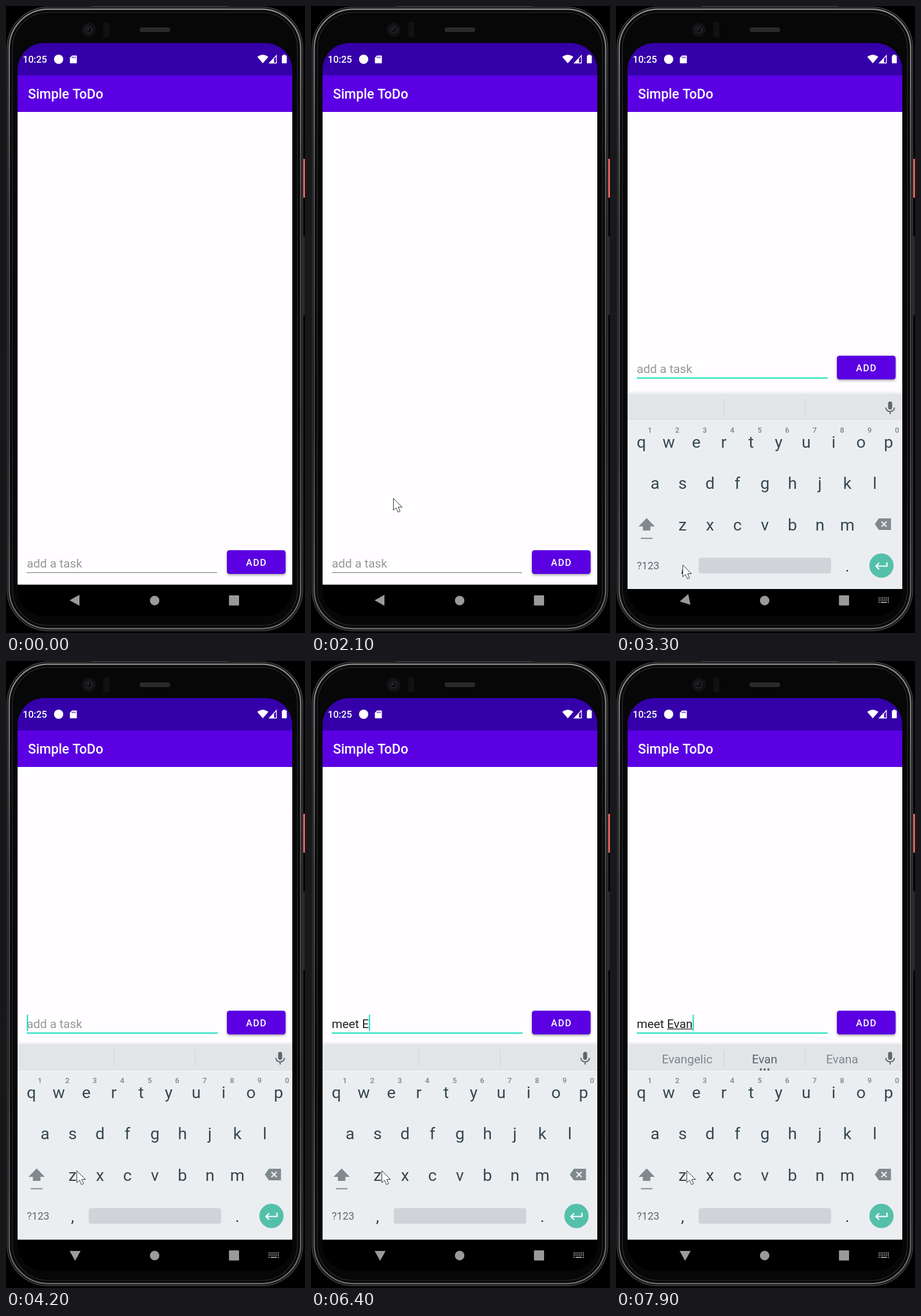
Write an HTML page with a canvas that moves like this. It is 517 px wide and 1083 px high and loops after 8 s.

```html
<!DOCTYPE html>
<html lang="en">
<head>
<meta charset="utf-8">
<title>Simple ToDo</title>
<style>
  html, body { margin: 0; width: 100%; height: 100%; overflow: hidden; background: #000; }
  canvas { display: block; }
</style>
</head>
<body>
<canvas width="517" height="1083"></canvas>
<script>
const ctx = document.querySelector('canvas').getContext('2d');
const LOOP = 8000, STEP = 100;
const FOCUS = 2750, RESIZE = 3200, KEYBOARD = 3300;
const TEAL = '#25dfc0', GREY = '#9a9a9c', KEY = '#37474f', ICON = '#80898d';
const MESSAGE = 'meet Evan';
const KEY_TIMES = [4950, 5150, 5350, 5550, 5850, 6350, 6750, 7050, 7350 + 200];
const POINTER = [
  [1800, 517, 640], [2100, 142, 850], [2600, 115, 965], [3300, 115, 965],
  [3600, 117, 945], [3900, 122, 880], [LOOP, 122, 880]
];

function rect(x, y, w, h, fill, r = 0) {
  ctx.fillStyle = fill;
  ctx.beginPath();
  ctx.roundRect(x, y, w, h, r);
  ctx.fill();
}

function circle(x, y, r, fill) {
  ctx.fillStyle = fill;
  ctx.beginPath();
  ctx.arc(x, y, r, 0, 7);
  ctx.fill();
}

function shape(d, fill, stroke, width = 1) {
  const path = new Path2D(d);
  if (fill) { ctx.fillStyle = fill; ctx.fill(path); }
  if (stroke) { ctx.strokeStyle = stroke; ctx.lineWidth = width; ctx.stroke(path); }
}

function text(str, x, y, size, fill, { weight = 400, align = 'left', spacing = 0 } = {}) {
  ctx.font = `${weight} ${size}px Roboto, sans-serif`;
  ctx.letterSpacing = spacing + 'px';
  ctx.textAlign = align;
  ctx.fillStyle = fill;
  ctx.fillText(str, x, y);
  return ctx.measureText(str).width;
}

function verticalFade(y0, y1, ...colors) {
  const g = ctx.createLinearGradient(0, y0, 0, y1);
  colors.forEach((c, i) => g.addColorStop(i / (colors.length - 1), c));
  return g;
}

function outline(inset, width, stroke) {
  ctx.strokeStyle = stroke;
  ctx.lineWidth = width;
  ctx.beginPath();
  ctx.roundRect(1 + inset, 1 + inset, 513 - 2 * inset, 1079 - 2 * inset, 72 - inset);
  ctx.stroke();
}

function drawPhone() {
  rect(0, 0, 517, 1083, '#000');
  rect(148, 0, 236, 2, '#303030');
  rect(513, 264, 4, 67, '#e2605c');
  rect(514, 398, 3, 136, '#252525');
  rect(1, 1, 513, 1079, '#070708', 72);
  outline(1, 1.5, '#454545');
  outline(4.5, 2.5, verticalFade(0, 1083, '#8a8a8a', '#4c4c4c', '#444', '#6c6c6c'));
  outline(10, 1.2, '#303032');
  circle(143, 41, 12, '#121214');
  circle(143, 41, 7, '#1d1d22');
  circle(143, 41, 3.5, '#08080a');
  circle(142, 40, 1.2, '#55555c');
  rect(168, 28, 11, 26, '#111113', 3);
  rect(231, 37, 53, 8, '#2b2929', 4);
}

function drawStatusBar() {
  rect(20, 64, 475, 57, '#3500a9', [46, 46, 0, 0]);
  text('10:25', 29, 98, 16.5, '#fff', { weight: 500 });
  circle(91, 92, 8, '#fff');
  shape('M114 85.5H121.5Q122.500 85.500 122.500 86.500V98Q122.500 99 121.500 99H111.500Q110.500 99 110.500 98V89.500Z', '#fff');
  shape('M114.500 87.500V90M117 87.500V90M119.500 87.500V90', null, '#3500a9', 1.2);
  shape('M434.500 88Q444 80.500 453.500 88L444 99Z', '#fff');
  shape('M467.500 85.500V98.500H455.500Z', null, '#fff', 1.4);
  shape('M463.500 90V99H454.500Z', '#fff');
  rect(477, 85.5, 8.5, 13.5, '#fff', 1);
  rect(479.2, 84, 4, 2, '#fff');
}

function drawField(t, dy) {
  const focused = t >= FOCUS;
  const count = KEY_TIMES.filter(k => k <= t).length;
  const typed = MESSAGE.slice(0, count);
  ctx.save();
  ctx.translate(0, dy);

  ctx.save();
  ctx.shadowColor = 'rgba(0,0,0,.35)';
  ctx.shadowBlur = 4;
  ctx.shadowOffsetY = 2;
  rect(382, 940, 101.5, 41, '#5a00e2', 4.6);
  ctx.restore();
  text('ADD', 415, 967, 16.2, '#fff', { weight: 500, spacing: 1.44 });

  if (focused) rect(36, 977.5, 330, 2.2, TEAL);
  else rect(36, 978, 329, 1.2, '#858585');

  const hint = text(typed || 'add a task', 36, 969.5, 20.8, typed ? '#202020' : '#979797');
  const end = 36 + (typed ? hint : 0);

  // The word being composed is underlined just after its first letter.
  const wordStart = typed.lastIndexOf(' ') + 1;
  if (wordStart < count && t >= KEY_TIMES[wordStart] + STEP) {
    const x = 36 + ctx.measureText(typed.slice(0, wordStart)).width;
    rect(x, 971, end - x, 1.2, '#202020');
  }
  const lastEdit = count ? KEY_TIMES[count - 1] : FOCUS;
  if (focused && Math.floor((t - lastEdit) / 500) % 2 === 0) rect(end, 947, 2.2, 28, TEAL);
  ctx.restore();
}

function drawKeyboard(t, dy) {
  const mid = { align: 'center' };
  ctx.save();
  ctx.translate(0, dy);
  rect(20, 656, 475, 6, verticalFade(656, 662, 'rgba(0,0,0,0)', 'rgba(0,0,0,.07)'));
  rect(20, 662, 475, 337, '#ebeef1');
  rect(20, 662, 475, 46, '#e2e5e8');
  rect(20, 708, 475, 1, '#f6f7f8');
  for (const x of [186, 327]) rect(x, 672, 1, 28, '#cdd1d4');

  if (t >= KEY_TIMES[7]) {
    text('Evangelic', 123, 694.5, 20.7, '#7d878c', mid);
    text('Evan', 257, 694.5, 20.7, '#57646a', mid);
    text('Evana', 391, 694.5, 20.7, '#7d878c', mid);
    for (const x of [250.5, 257, 263.5]) circle(x, 705.5, 1.9, '#57646a');
  }

  rect(470.5, 675, 7, 14, '#5d686d', 3.5);
  shape('M466.500 685.500A7.500 7 0 0 0 481.500 685.500M474 692.500V697', null, '#5d686d', 2);

  [['qwertyuiop', 43.75, 754.5], ['asdfghjkl', 67.5, 826], ['zxcvbnm', 115, 897.5]].forEach(([row, x, y]) =>
    [...row].forEach((c, i) => text(c, x + 47.5 * i, y, 28.5, KEY, mid)));
  for (let i = 0; i < 10; i++)
    text((i + 1) % 10, 58.5 + 47.5 * i, 728.5, 13, '#7b858a', { weight: 500, align: 'center' });

  shape('M53 876.500L67 891H59.500V898H46.500V891H39Z', ICON);
  rect(43, 910.5, 20, 2, ICON);
  shape('M447.500 887L454.500 877H475.500V897H454.500Z', ICON);
  shape('M459 882.500L468 891.500M468 882.500L459 891.500', null, '#ebeef1', 2.3);

  text('?123', 55.5, 965, 18, '#5d696f', mid);
  text(',', 115, 968.5, 28.5, KEY, mid);
  text('.', 400, 968.5, 28.5, KEY, mid);
  rect(143, 945, 229, 27, '#d0d4d8', 4);
  circle(459, 958.5, 21, '#55c0aa');
  shape('M468.500 953V959.500H450M455 954L449.500 959.500L455 965', null, '#fff', 2.2);
  ctx.restore();
}

function drawNavBar(t) {
  const turn = Math.min(90, Math.max(0, 12 + (t - KEYBOARD) * 0.36));
  ctx.save();
  ctx.translate(119.5, 1026.5);
  ctx.rotate(t < KEYBOARD ? 0 : -turn * Math.PI / 180);
  shape('M-9.500 0L7.500 -9.500V9.500Z', GREY);
  ctx.restore();
  circle(257, 1027, 8.2, GREY);
  rect(385.5, 1018, 17.5, 17.5, GREY, 1);
  if (t < RESIZE) return;
  for (let row = 0; row < 2; row++)
    for (let x = 454; x < 472; x += 3.2) rect(x, 1021.5 + row * 3.6, 2, 2, GREY);
  for (const x of [454, 470]) rect(x, 1028.7, 2, 2, GREY);
  rect(457.5, 1029, 11, 2, GREY);
}

function drawPointer(t) {
  const i = POINTER.findIndex(([time]) => time > t);
  if (i < 1) return;
  const [t0, x0, y0] = POINTER[i - 1], [t1, x1, y1] = POINTER[i];
  const p = (t - t0) / (t1 - t0);
  ctx.save();
  ctx.translate(x0 + (x1 - x0) * p + 0.5, y0 + (y1 - y0) * p + 0.5);
  shape('M0 0V20.500L4.600 16.300L8 23.800L11.600 22.200L8.400 15H15Z', '#fff', '#333');
  ctx.restore();
}

function draw(now) {
  const t = Math.floor(now % LOOP / STEP) * STEP;
  drawPhone();
  rect(20, 999, 475, 55, '#000', [0, 0, 46, 46]);
  rect(20, 183, 475, 816.5, '#fffdff');
  drawStatusBar();
  rect(20, 120, 475, 63, '#5a00e2');
  text('Simple ToDo', 38, 160, 23.1, '#fff', { weight: 500 });
  drawField(t, t >= RESIZE ? -336 : 0);
  if (t >= KEYBOARD) drawKeyboard(t, Math.max(0, 8 - (t - KEYBOARD) * 0.06));
  drawNavBar(t);
  drawPointer(t);
}

const start = performance.now();
function frame() {
  draw(performance.now() - start);
  requestAnimationFrame(frame);
}
frame();
</script>
</body>
</html>
```
